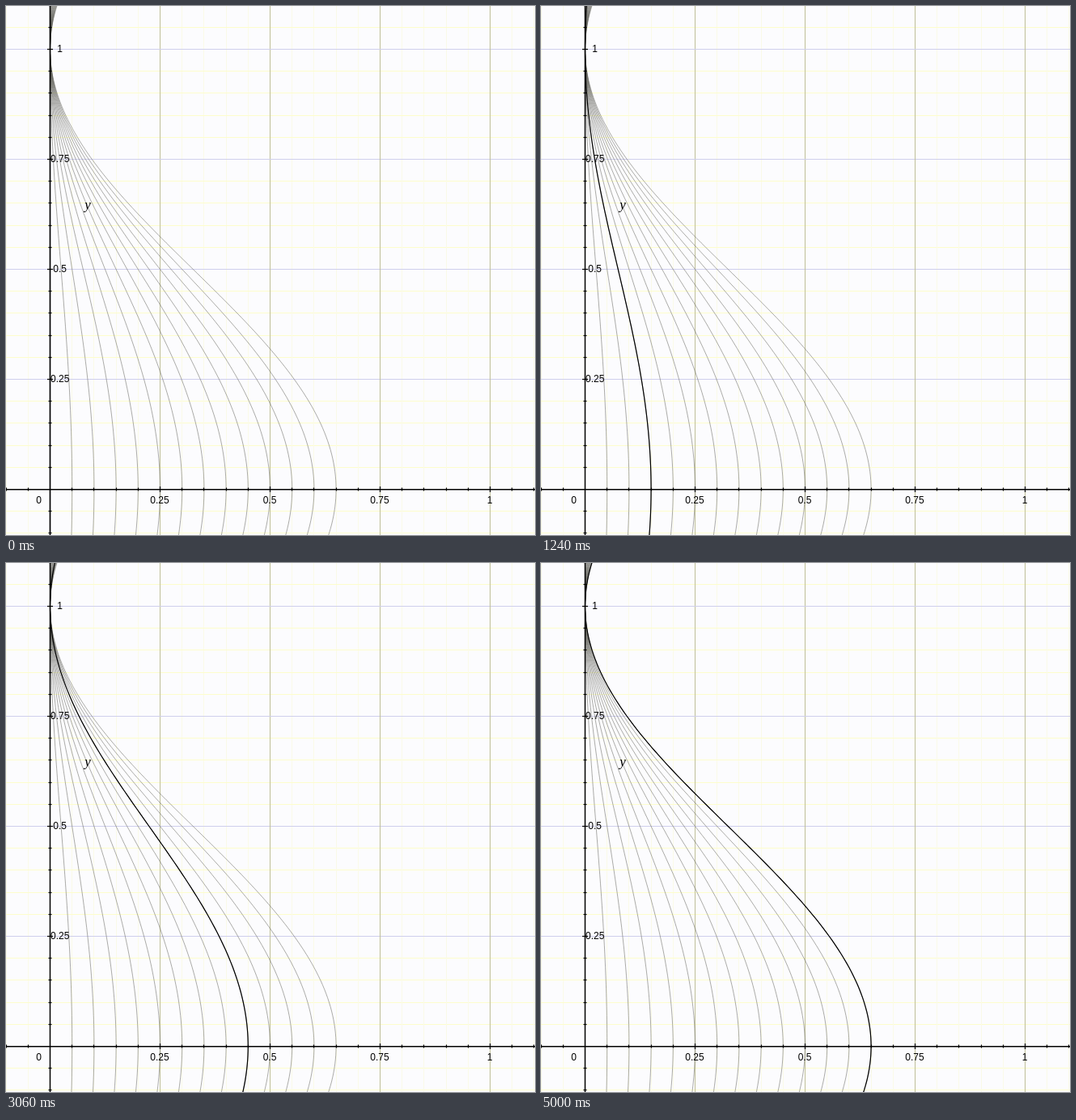
Write an HTML page that moves like this. It is 654x654 px and loops after 5.06 s.

```html
<!DOCTYPE html>
<html lang="en">
<head>
<meta charset="utf-8">
<title>Cosine curve family</title>
<style>
  html, body { margin: 0; width: 100%; height: 100%; overflow: hidden; background: #fcfcfe; }
  svg { display: block; width: 100%; height: 100%; }
  path { fill: none; }
  .label { font: 12px "Liberation Sans", Arial, sans-serif; text-anchor: middle; }
  .name { font: italic 17px "Liberation Serif", Times, serif; text-anchor: middle; }
</style>
</head>
<body>
<svg id="plot" viewBox="0 0 654 654"></svg>
<script>
const SIZE = 654, UNIT = 544, ORIGIN = { x: 54.5, y: 597.5 };
const LOOP = 5060, FIRST_STEP = 240, STEP = 350, CURVES = 13, SPACING = 0.05;
const svg = document.getElementById('plot');

const px = x => ORIGIN.x + x * UNIT;
const py = y => ORIGIN.y - y * UNIT;
const crisp = v => Math.floor(v) + 0.5;

function add(tag, attrs, text) {
  const el = document.createElementNS('http://www.w3.org/2000/svg', tag);
  for (const key in attrs) el.setAttribute(key, attrs[key]);
  if (text) el.textContent = text;
  svg.appendChild(el);
  return el;
}

const line = (d, stroke, width = 1) => add('path', { d, stroke, 'stroke-width': width });
const across = (y, stroke, width) => line(`M0 ${y}H${SIZE}`, stroke, width);
const down = (x, stroke, width) => line(`M${x} 0V${SIZE}`, stroke, width);
const label = (x, y, text) => add('text', { class: 'label', x, y }, text);

// x = a (1 + cos πy) / 2
function curve(a) {
  let d = '';
  for (let y = -0.11; y <= 1.111; y += 0.01) {
    const x = a * (1 + Math.cos(Math.PI * y)) / 2;
    d += `${d ? 'L' : 'M'}${px(x).toFixed(2)} ${py(y).toFixed(2)}`;
  }
  return d;
}

function drawGrid() {
  for (let i = -2; i <= 22; i++) {
    if (i % 5 === 0) continue;
    down(crisp(px(i * SPACING)), '#fafae8');
    across(crisp(py(i * SPACING)), '#fdfdcc');
  }
  for (let i = 1; i <= 4; i++) {
    across(crisp(py(i / 4)), '#cfcfec');
    down(crisp(px(i / 4)), '#bfbf98');
  }
}

function drawAxes() {
  across(ORIGIN.y + 0.25, '#000', 1.5);
  down(ORIGIN.x, '#000', 1.5);
  for (let i = -2; i <= 22; i++) {
    if (i === 0) continue;
    const r = i % 5 ? 2 : 3.5;
    const x = crisp(px(i * SPACING)), y = crisp(py(i * SPACING));
    line(`M${x} ${ORIGIN.y - r}v${2 * r}`, '#000', 1.2);
    line(`M${ORIGIN.x - r} ${y}h${2 * r}`, '#000', 1.2);
  }
  label(40.5, 615, '0');
  for (let i = 1; i <= 4; i++) {
    label(px(i / 4) - 0.5, 615, String(i / 4));
    label(66.7, py(i / 4) + 3.5, String(i / 4));
  }
  add('text', { class: 'name', x: 101, y: 251 }, 'y');
}

drawGrid();
for (let i = 1; i <= CURVES; i++) {
  line(curve(i * SPACING), '#606058', 0.8).setAttribute('opacity', 0.65);
}
drawAxes();
const active = line('', '#000', 1.2);

let shown = -1;
function update(time) {
  const t = time % LOOP;
  const index = Math.max(0, Math.min(CURVES, Math.floor((t - FIRST_STEP) / STEP) + 1));
  if (index === shown) return;
  shown = index;
  active.setAttribute('d', curve(index * SPACING));
}

const start = performance.now();
function tick() {
  update(performance.now() - start);
  requestAnimationFrame(tick);
}
tick();
</script>
</body>
</html>
```
